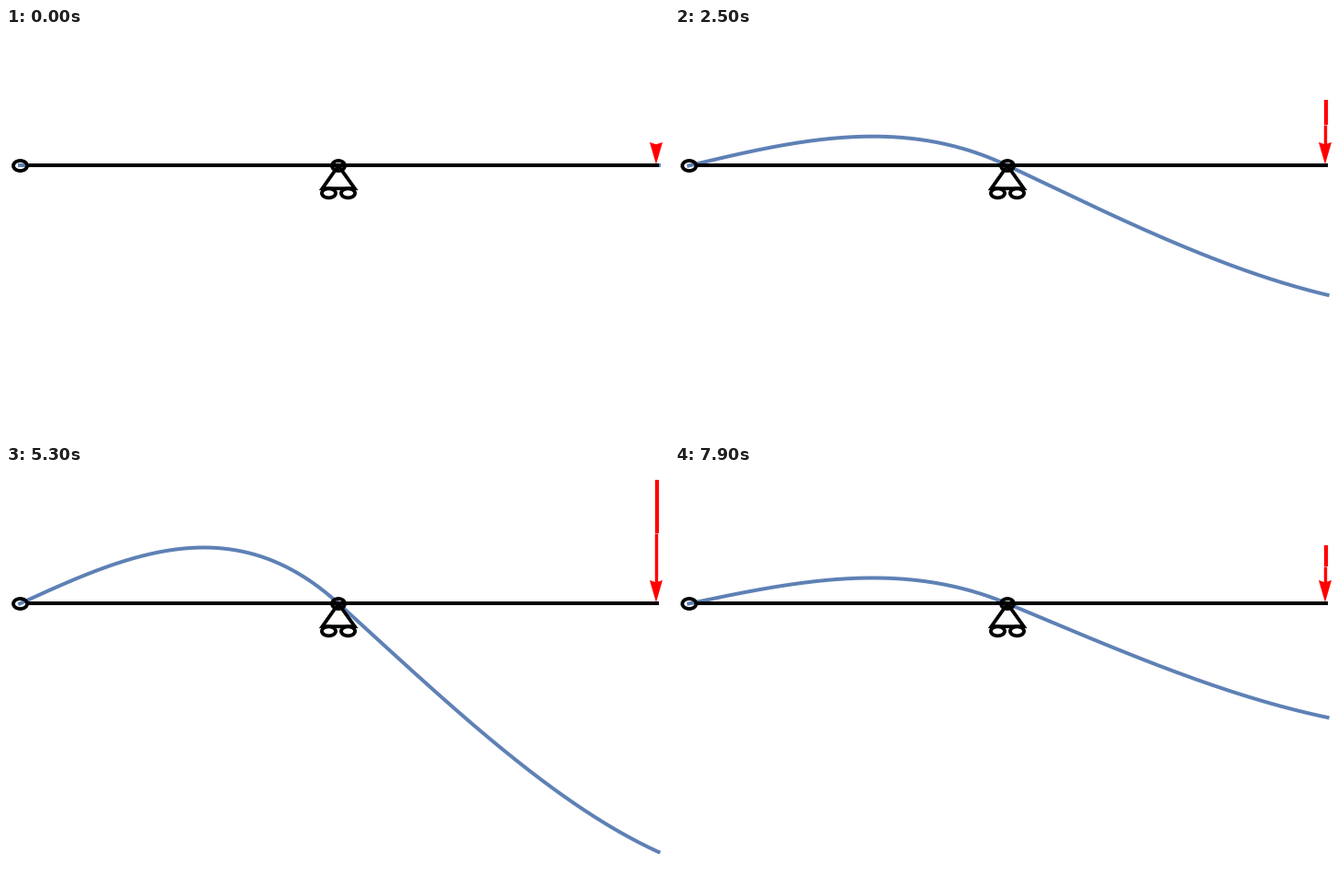
A matplotlib script that plays this animation: 720 px wide and 445 px high, repeating every 8 s.

```python
import numpy as np
import matplotlib.pyplot as plt
from matplotlib.animation import FuncAnimation
from matplotlib.patches import Ellipse, Polygon

W, H, DPI = 720, 445, 100
FRAMES, STEP_MS, PEAK = 80, 100, 50
LEFT, PIVOT, RIGHT, BEAM_Y = 15.0, 361.2, 708.6, 149.4
TIP_STEP = 5.615        # tip deflection per load step
SHAFT_STEP = 2.76       # arrow growth per load step
BLUE = "#5e81b5"

fig = plt.figure(figsize=(W / DPI, H / DPI), dpi=DPI, facecolor="white")
ax = fig.add_axes([0, 0, 1, 1])
ax.set_xlim(0, W)
ax.set_ylim(H, 0)
ax.axis("off")


def pt(px):
    return px * 72 / DPI


def line(xs, ys, color, width, z, cap="butt"):
    return ax.plot(xs, ys, color=color, lw=pt(width), zorder=z,
                   solid_capstyle=cap, solid_joinstyle="miter")[0]


def ring(x, y, w, h):
    ax.add_patch(Ellipse((x, y), w, h, fill=False, ec="black", lw=pt(3.8), zorder=4))


# Deflected shape for a unit tip deflection
x = np.linspace(LEFT, RIGHT, 300)
u = (x - LEFT) / (PIVOT - LEFT)
s = (x - PIVOT) / (RIGHT - PIVOT)
span = -u * (1 - u ** 2)
overhang = 2 * s + 0.109 * s ** 2 - 0.406 * s ** 3
shape = np.where(u < 1, span, overhang) / 1.703

curve = line(x, x * 0 + BEAM_Y, BLUE, 4, 1, "projecting")
line([21, RIGHT], [BEAM_Y, BEAM_Y], "black", 4, 3)

# Supports
ring(15.5, 149.5, 15, 11)
ring(361, 149.5, 14, 11)
ax.add_patch(Polygon([(361, 149.5), (343.5, 174.2), (378.8, 174.2)], fill=False,
                     ec="black", lw=pt(3.8), joinstyle="miter", zorder=4))
for cx in (350.5, 371.5):
    ring(cx, 179.3, 15, 10)

# Load arrow
ax.add_patch(Polygon([(706, 148), (699, 124), (706, 126.3), (713, 124)],
                     fc="red", ec="none", zorder=5))
shaft = line([706.4, 706.4], [128, 128], "red", 3.4, 5)
shaft_top = line([706.6, 706.6], [128, 128], "red", 4.2, 5)


def update(frame):
    n = frame if frame <= PEAK else 2 * PEAK + 1 - frame
    curve.set_ydata(BEAM_Y + n * TIP_STEP * shape)
    top = 147.2 - SHAFT_STEP * n
    if n < 10:
        top = np.clip(top, 124, 131)
    middle = (top + 131.5) / 2
    shaft.set_ydata([middle, 131.5])
    shaft_top.set_ydata([top, middle])
    return curve, shaft, shaft_top


anim = FuncAnimation(fig, update, frames=FRAMES, interval=STEP_MS,
                     repeat=True, repeat_delay=0, blit=False)
plt.show()
```
